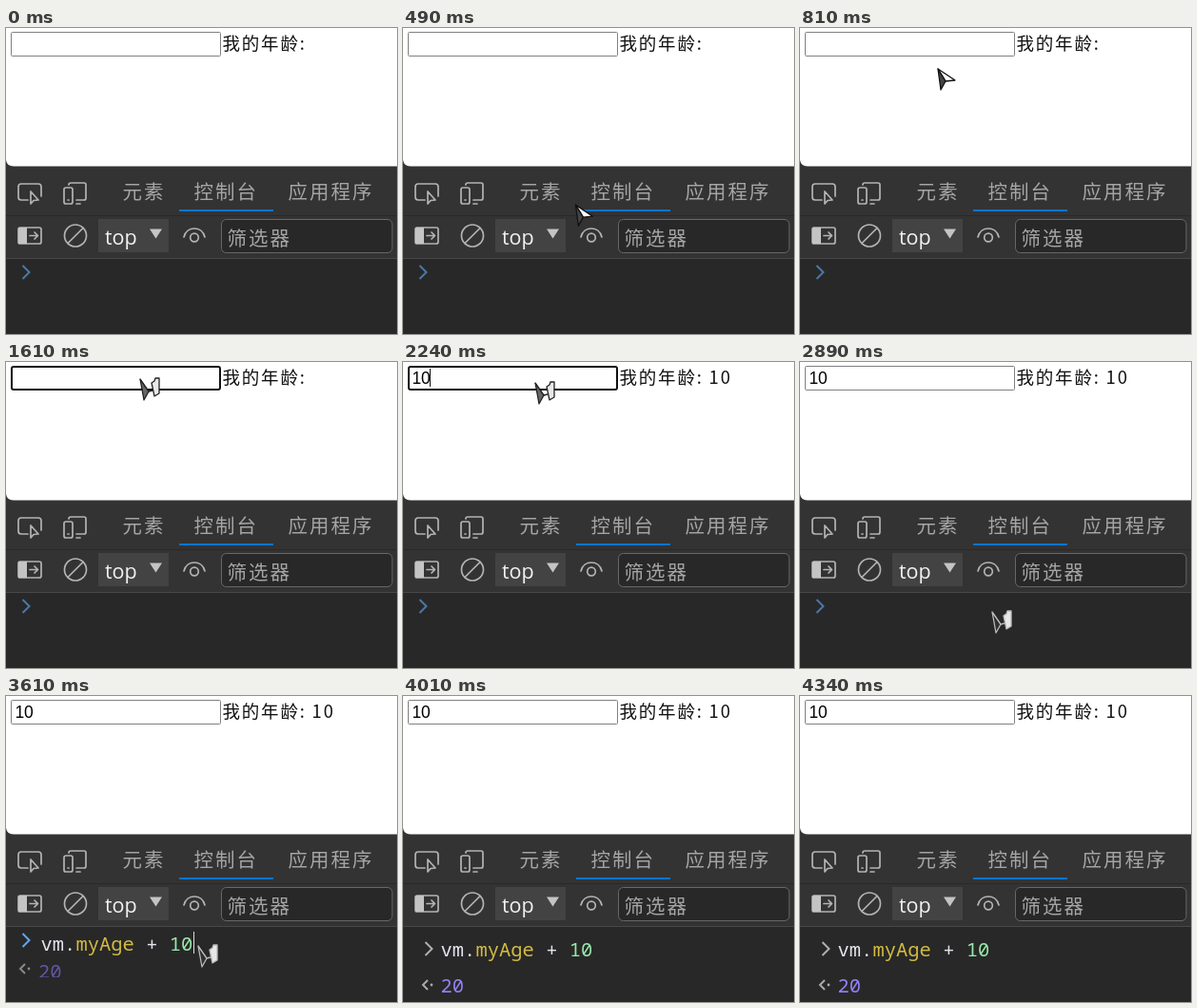
Write an HTML page that moves like this. It is 411x322 px and loops after 5280 ms.

```html
<!DOCTYPE html>
<html lang="zh">
<head>
<meta charset="utf-8">
<style>
  html, body { margin: 0; width: 100%; height: 100%; overflow: hidden; background: #282828; }
  svg { display: block; width: 100vw; height: 100vh; }
  text { white-space: pre; }
  .cjk { font-family: "Noto Sans CJK SC", "Noto Sans CJK", sans-serif; }
  .page { font-size: 18.5px; letter-spacing: 1.8px; fill: #111; }
  .tool { font-size: 20.5px; letter-spacing: 2px; fill: #a5a5a5; }
  .mono { font: 500 20.5px "Noto Sans Mono", "DejaVu Sans Mono", monospace; }
  .icon { fill: none; stroke: #b4b4b4; stroke-width: 1.7; stroke-linecap: round; stroke-linejoin: round; }
  .icon .solid { fill: #c4c4c4; stroke: none; }
  .chevron { fill: none; stroke-width: 2; }
</style>
</head>
<body>
<svg viewBox="0 0 411 322">
  <!-- Web page -->
  <rect width="411" height="243" fill="#333"/>
  <path d="M0 0H411V145.500H8Q1 145.500 0 139Z" fill="#fff"/>
  <rect id="field" fill="#fff"/>
  <text id="typed" x="9.4" y="22.5" font-family="Liberation Sans, Arial, sans-serif" font-size="17.5"></text>
  <path id="fieldCaret" stroke="#111" d="M28.5 7V26"/>
  <text id="age" class="cjk page" x="227.500" y="22.500"></text>

  <!-- Developer tools -->
  <path d="M0 197.5H411" stroke="#292929"/>
  <path d="M0 242.5H411" stroke="#484848"/>
  <rect x="182" y="191" width="99" height="2" fill="#0b75cc"/>
  <g class="cjk tool">
    <text x="122.500" y="179.500">元素</text>
    <text x="197.500" y="179.500">控制台</text>
    <text x="296.500" y="179.500">应用程序</text>
  </g>
  <rect x="97" y="201" width="74" height="35" fill="#434343"/>
  <text x="104" y="228" font-family="Open Sans, Noto Sans, sans-serif" font-size="21.5" font-weight="500" fill="#f2f2f2">top</text>
  <rect x="226.5" y="201.5" width="179.5" height="35" rx="5" fill="#282828" stroke="#686868"/>
  <text class="cjk tool" x="232.500" y="228.500">筛选器</text>
  <g class="icon">
    <path d="M23 181H16Q13 181 13 178V167Q13 164 16 164H34Q37 164 37 167V177M26 172V185L29 181.500L34 181Z"/>
    <path d="M66 165Q66 163 68 163H82Q84 163 84 165V179Q84 181 82 181H74M74 185H78"/>
    <rect x="61" y="168" width="9" height="17" rx="2"/><path d="M65 181H66"/>
    <rect x="13" y="210" width="24" height="17" rx="2"/>
    <path class="solid" d="M13 210H22V227H13Z"/>
    <path d="M25 218.500H33M30 215L33.500 218.500L30 222"/>
    <circle cx="73" cy="218.500" r="11.500"/><path d="M65 226.500L81 210.500"/>
    <path class="solid" d="M151 211.500H164L157.500 221.500Z"/>
    <path d="M187 220C190 208 206 208 209 220"/><circle cx="198" cy="220.500" r="4.300"/>
  </g>

  <!-- Console -->
  <rect y="243" width="411" height="79" fill="#282828"/>
  <path id="prompt" class="chevron" d="M0 0L7 7L0 14"/>
  <text id="command" class="mono"><tspan fill="#e4e4ee">vm.</tspan><tspan fill="#d2bb42">myAge</tspan><tspan fill="#e4e4ee"> + </tspan><tspan fill="#98e8aa">10</tspan></text>
  <path id="consoleCaret" stroke="#ddd" d="M197.500 248V271"/>
  <clipPath id="previewArea"><rect y="243" width="411" height="53"/></clipPath>
  <g id="preview" clip-path="url(#previewArea)">
    <path class="chevron" stroke="#888" d="M20 282L15 287L20 292"/><circle cx="24" cy="287" r="1.400" fill="#888"/>
    <text class="mono" x="34" y="297" fill="#6156a5">20</text>
  </g>
  <g id="result">
    <path class="chevron" stroke="#aaa" d="M26 299L21 304L26 309"/><circle cx="30" cy="304" r="1.400" fill="#aaa"/>
    <text class="mono" x="39.500" y="312" fill="#9581f5">20</text>
  </g>

  <!-- Mouse pointer -->
  <g id="pointer" stroke-width="1.300" stroke-linejoin="round">
    <g id="arrow" stroke="#111">
      <path d="M0 0L18 12L8 13Z" fill="#fff"/>
      <path d="M0 0L3 22L8 13Z" fill="#444"/>
    </g>
    <g id="beam">
      <path id="beamArrow" d="M0 0L4 22L9 13Z"/>
      <path d="M0 0L9 13L13 12" fill="none"/>
      <path d="M12 4L15 2L16 -1H20V15L15 18Z" fill="#e8e8e8"/>
    </g>
  </g>
</svg>
<script>
  const LOOP = 5280, STEP = 80;
  const FOCUS = 1050, CARET_OFF = 1610, FIRST_DIGIT = 1770, SECOND_DIGIT = 2010;
  const BLUR = 2810, PROMPT_FOCUS = 2970, PASTE = 3530, PREVIEW = 3610, ENTER = 4010;
  const pointerPath = [
    [240, 205, 279], [800, 145, 43], [1040, 141, 18],
    [2160, 141, 18], [2240, 139, 22], [2720, 202, 263]
  ];

  const el = id => document.getElementById(id);
  const set = (id, attrs) => {
    for (const name in attrs) el(id).setAttribute(name, attrs[name]);
  };
  const show = (id, on) => set(id, { visibility: on ? 'inherit' : 'hidden' });
  const between = (t, from, to) => t >= from && t < to;

  function pointerAt(t) {
    const next = pointerPath.findIndex(key => key[0] > t);
    if (next < 0) return pointerPath.at(-1).slice(1);
    if (next === 0) return pointerPath[0].slice(1);
    const [t0, x0, y0] = pointerPath[next - 1], [t1, x1, y1] = pointerPath[next];
    const u = (t - t0) / (t1 - t0), ease = u * u * (3 - 2 * u);
    return [x0 + (x1 - x0) * ease, y0 + (y1 - y0) * ease];
  }

  function drawPage(t) {
    const focused = between(t, FOCUS, BLUR);
    const value = t < FIRST_DIGIT ? '' : t < SECOND_DIGIT ? '1' : '10';
    set('field', focused
      ? { x: 6, y: 5, width: 219, height: 24, rx: 2, stroke: '#111', 'stroke-width': 2 }
      : { x: 5.5, y: 4.5, width: 220, height: 25, rx: 1, stroke: '#808080', 'stroke-width': 1 });
    el('typed').textContent = value;
    el('age').textContent = '我的年龄: ' + value;
    set('fieldCaret', { transform: `translate(${(value.length - 2) * 9.73})` });
    show('fieldCaret', between(t, FOCUS, CARET_OFF) || between(t, FIRST_DIGIT, SECOND_DIGIT + 530));
  }

  function drawConsole(t) {
    const entered = t >= ENTER;
    set('prompt', {
      transform: entered ? 'translate(23.5 259)' : 'translate(17.500 250)',
      stroke: entered ? '#b0b0b0' : t >= PROMPT_FOCUS ? '#62a6ee' : '#4b78a8'
    });
    set('command', { x: entered ? 39.5 : 36.5, y: entered ? 274 : 268 });
    set('consoleCaret', { transform: `translate(${t < PASTE ? -160 : 0})` });
    show('command', t >= PASTE);
    show('consoleCaret', between(t, PROMPT_FOCUS, ENTER));
    show('preview', between(t, PREVIEW, ENTER));
    show('result', entered);
  }

  function drawPointer(t) {
    const [x, y] = pointerAt(Math.floor(t / STEP) * STEP);
    const inConsole = y > 243, overText = y < 30 || inConsole;
    set('pointer', { transform: `translate(${x} ${y})` });
    set('beam', { stroke: inConsole ? '#bbb' : '#222' });
    set('beamArrow', { fill: inConsole ? '#303030' : '#666' });
    show('pointer', between(t, 240, ENTER));
    show('arrow', !overText);
    show('beam', overText);
  }

  function frame() {
    const t = performance.now() % LOOP;
    drawPage(t);
    drawConsole(t);
    drawPointer(t);
    requestAnimationFrame(frame);
  }
  frame();
</script>
</body>
</html>
```
